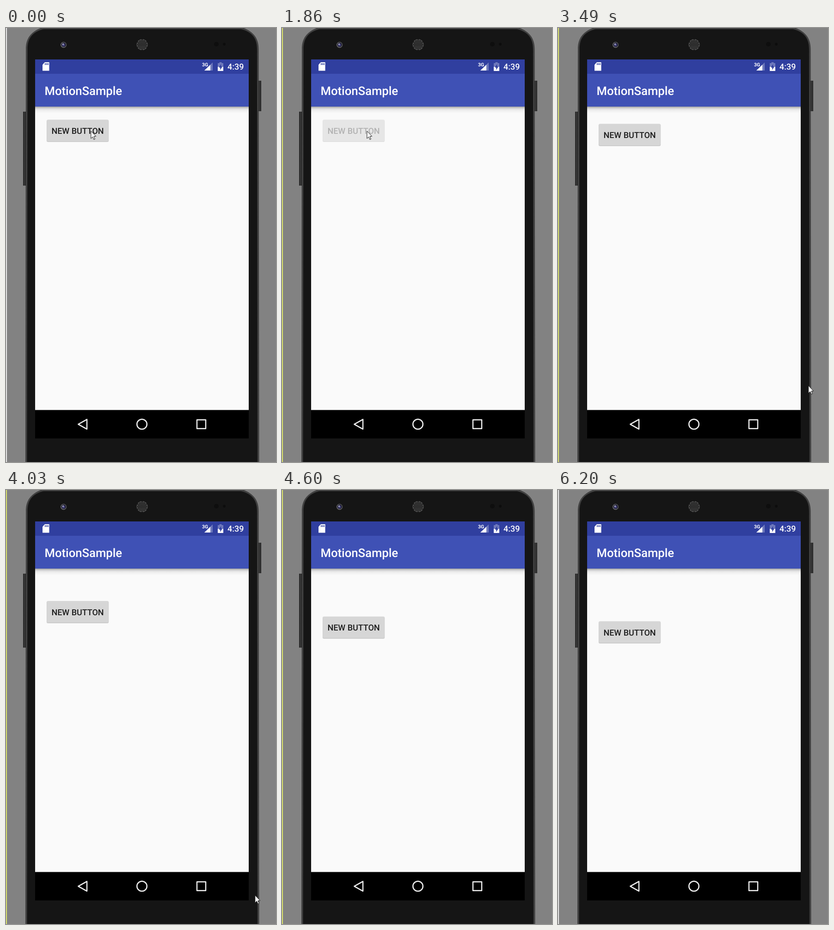
An HTML page with a canvas for the animation above (6300 ms loop, 584x939 px).

```html
<!DOCTYPE html>
<html lang="en">
<head>
<meta charset="utf-8">
<title>Button motion</title>
<style>
  html, body { margin: 0; width: 100%; height: 100%; overflow: hidden; background: #828282; }
  canvas { display: block; }
</style>
</head>
<body>
<canvas id="stage" width="584" height="939"></canvas>
<script>
const ctx = document.getElementById('stage').getContext('2d');
const LOOP = 6300;
const FONT = 'Roboto, "Open Sans", sans-serif';

// The screen refreshes in even steps after the click.
const CLICK = 1030, STEP = 135.7;
const FADE = { start: 1075, length: 2000 };
const SLIDE = { start: 3070, length: 1920, distance: 85.56 };

// Pointer key points: step, x, y. It disappears after the last one.
const PATH = [
  [11, 184, 223], [14, 221, 250], [18, 542, 774],
  [20, 567, 862], [22, 539, 877], [24, 455, 915]
];

const mix = (a, b, p) => a + (b - a) * p;
const grey = (from, to, p) => `rgb(${Array(3).fill(Math.round(mix(from, to, p)))})`;
const black = alpha => `rgba(0,0,0,${alpha})`;

function ease(t, { start, length }) {
  const p = Math.min(1, Math.max(0, (t - start) / length));
  return (1 - Math.cos(Math.PI * p)) / 2;
}

function rect(color, x, y, w, h) {
  ctx.fillStyle = color;
  ctx.fillRect(x, y, w, h);
}

function round(color, x, y, w, h, r) {
  ctx.fillStyle = color;
  ctx.beginPath();
  ctx.roundRect(x, y, w, h, r);
  ctx.fill();
}

function disc(color, x, y, r) {
  ctx.fillStyle = color;
  ctx.beginPath();
  ctx.arc(x, y, r, 0, Math.PI * 2);
  ctx.fill();
}

function trace(...points) {
  ctx.beginPath();
  points.forEach(([x, y]) => ctx.lineTo(x, y));
  ctx.closePath();
}

function poly(color, ...points) {
  trace(...points);
  ctx.fillStyle = color;
  ctx.fill();
}

function label(text, x, y, size, color, align = 'left', weight = 500) {
  ctx.font = `${weight} ${size}px ${FONT}`;
  ctx.textRendering = 'geometricPrecision';
  ctx.textAlign = align;
  ctx.fillStyle = color;
  ctx.fillText(text, x, y);
}

function gradient(x0, y0, x1, y1, ...colors) {
  const g = ctx.createLinearGradient(x0, y0, x1, y1);
  colors.forEach((c, i) => g.addColorStop(i / (colors.length - 1), c));
  return g;
}

function shell(inset, color) {
  const l = 42 + inset, r = 547.5 - inset;
  ctx.fillStyle = color;
  ctx.beginPath();
  ctx.moveTo(l, 939);
  ctx.lineTo(l + 1, 46);
  ctx.bezierCurveTo(l + 1, 22, l + 12, 8, l + 36, inset - 1);
  ctx.lineTo(r - 36, inset - 1);
  ctx.bezierCurveTo(r - 12, 8, r - 1, 22, r - 1, 46);
  ctx.lineTo(r, 939);
  ctx.fill();
}

function drawSpeaker(cx, cy, radius) {
  const gap = 3.2;
  disc('#4e4e4e', cx, cy, radius);
  for (let row = -4; row <= 4; row++) {
    for (let col = -4; col <= 4; col++) {
      const x = (col + (row & 1) / 2) * gap, y = row * gap * 0.866;
      if (Math.hypot(x, y) < radius - 0.8) disc('#0c0c0c', cx + x, cy + y, 1.15);
    }
  }
}

function drawPhone() {
  rect(gradient(37, 0, 42, 0, '#1a1a1a', '#3a3a3a', '#2c2c2c'), 37, 181, 6, 160);
  rect(gradient(547, 0, 552, 0, '#2c2c2c', '#3a3a3a', '#1a1a1a'), 546, 114, 6, 66);
  ['#343434', '#505050', '#2c2c2c', '#151515'].forEach((c, i) => shell(i * 1.3, c));

  disc('#66666a', 124.5, 36.5, 6.5);
  disc('#1c1c2a', 124.8, 36.2, 5);
  disc('#45437c', 124.5, 36.5, 3.2);
  disc('#c4c4dc', 123.4, 35, 1.5);
  drawSpeaker(294.5, 36, 12);
  disc('#0e0e0e', 455, 35, 5);
  disc('#0d0d0d', 472, 35, 3);
}

function drawStatus() {
  const bar = '#303f9f', faded = 'rgba(255,255,255,.3)';
  rect(bar, 63, 68, 462, 31);

  poly('#fff', [84, 74], [93.5, 74], [93.5, 92.5], [79, 92.5], [79, 79.5]);
  for (let i = 0; i < 3; i++) rect(bar, 84 + i * 3, 76, 1.6, 4);

  label('3G', 424, 83, 10.5, '#fff', 'left', 700);
  poly(faded, [447, 74.5], [447, 92], [429, 92]);
  poly('#fff', [442, 79.5], [442, 92], [429, 92]);

  rect(faded, 461.5, 74, 5, 2);
  rect(faded, 458, 76, 12, 8);
  rect('#fff', 458, 84, 12, 9);
  poly(bar, [465.2, 78], [460.3, 85.6], [463.3, 85.6], [463.3, 91], [468, 83.2], [465.2, 83.2]);

  label('4:39', 514.5, 90, 18, '#fff', 'right');
}

function drawNav() {
  rect('#000', 63, 826.5, 462, 61.5);
  ctx.strokeStyle = '#eee';
  ctx.lineWidth = 2.5;
  ctx.lineJoin = 'round';
  trace([156.3, 857.3], [175, 846.8], [175, 867.8]);
  ctx.stroke();
  ctx.beginPath();
  ctx.arc(294, 857.2, 10.8, 0, Math.PI * 2);
  ctx.stroke();
  ctx.strokeRect(413, 847.8, 19, 19);
}

function drawScreen() {
  rect('#fafafa', 63, 170, 462, 657);
  rect(gradient(0, 170, 0, 183, ...[0.36, 0.17, 0.07, 0.03, 0.015].map(black)),
       63, 170, 462, 13);
  rect('#3f51b5', 63, 99, 462, 71);
  label('MotionSample', 83.5, 144.5, 25.67, '#fff');
  drawStatus();
  drawNav();
}

function drawButton(t) {
  const shown = t <= CLICK ? 1 : ease(t, FADE);
  const body = Math.sqrt(shown);
  const y = 198.6 + ease(t, SLIDE) * SLIDE.distance;
  round(black(0.07 * body), 87.6, y - 0.4, 134.8, 48.6, 3.4);
  round(black(0.16 * body), 88, y + 0.8, 134, 46.8, 3);
  round(grey(250, 214, body), 88.3, y, 133.4, 46.4, 2.6);
  label('NEW BUTTON', 155, y + 30.4, 17.97, grey(250, 28, shown), 'center');
}

function drawPointer(step) {
  if (step > PATH.at(-1)[0]) return;
  const s = Math.max(step, PATH[0][0]);
  const i = Math.max(1, PATH.findIndex(key => key[0] >= s));
  const [s0, x0, y0] = PATH[i - 1], [s1, x1, y1] = PATH[i];
  const p = (s - s0) / (s1 - s0);

  ctx.save();
  ctx.translate(mix(x0, x1, p) - 0.2, mix(y0, y1, p));
  poly('#fff', [0, 0], [0, 16], [3.7, 12.6], [6.2, 18.4], [8.6, 17.4], [6.2, 11.6], [10.8, 11.3]);
  ctx.strokeStyle = '#1a1a1a';
  ctx.lineWidth = 1;
  ctx.lineJoin = 'miter';
  ctx.stroke();
  ctx.restore();
}

function draw(now) {
  const time = now % LOOP;
  const step = Math.max(-1, Math.floor((time - CLICK) / STEP));
  const t = CLICK + step * STEP;
  rect('#828282', 0, 0, 584, 939);
  rect(time >= CLICK && time < LOOP - 100 ? '#d8e06c' : '#e6e6e6', 0, 0, 2, 939);
  drawPhone();
  drawScreen();
  drawButton(t);
  drawPointer(step);
}

const begin = performance.now();
function loop() {
  draw(performance.now() - begin);
  requestAnimationFrame(loop);
}
loop();
</script>
</body>
</html>
```
